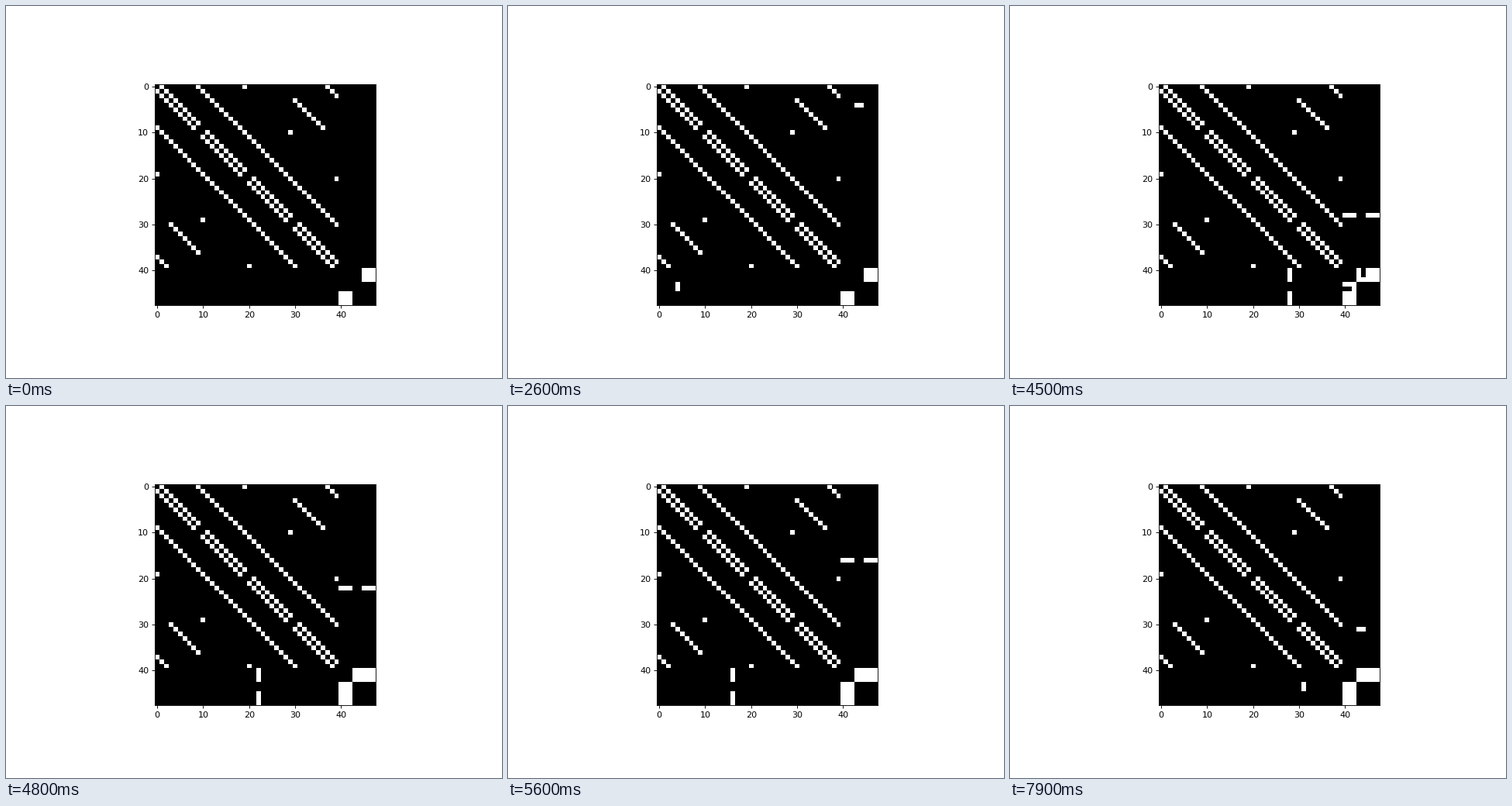
A matplotlib script that plays this animation: 640 px wide and 480 px high, repeating every 8000 ms.

```python
import numpy as np
import matplotlib.pyplot as plt
from matplotlib.animation import FuncAnimation

PLANES, PER_PLANE = 4, 10
SATS = PLANES * PER_PLANE
TEAM_A = [40, 41, 42]
ROVERS = [43, 44]
TEAM_B = [45, 46, 47]
NODES = 48
FRAMES, STEP_MS = 80, 100

# Each pass: first step, number of steps, plane, slot at its start, stations.
# The satellite overhead moves back two slots per step.
PASSES = [
    (5, 6, 1, 8, ROVERS),
    (25, 3, 0, 6, ROVERS),
    (41, 8, 2, 6, TEAM_A + TEAM_B),
    (49, 9, 1, 0, TEAM_A + TEAM_B),
    (58, 3, 1, 9, TEAM_A + TEAM_B[:2]),
    (61, 1, 1, 5, TEAM_A),
    (76, 4, 3, 7, ROVERS),
]

# Ground links that appear as the rovers approach: step, rover, station.
APPROACH = [(39, 43, 42), (41, 43, 41), (43, 43, 40),
            (44, 44, 42), (46, 44, 41), (48, 44, 40)]


def link(m, a, b):
    m[a, b] = m[b, a] = 1


def constellation():
    m = np.zeros((NODES, NODES))
    for p in range(PLANES):
        for k in range(PER_PLANE):
            sat = p * PER_PLANE + k
            link(m, sat, p * PER_PLANE + (k + 1) % PER_PLANE)
            shift = 1 if p < PLANES - 1 else -3
            q = (p + 1) % PLANES
            link(m, sat, q * PER_PLANE + (k - shift) % PER_PLANE)
    for a in TEAM_A:
        for b in TEAM_B:
            link(m, a, b)
    return m


BASE = constellation()


def adjacency(i):
    m = BASE.copy()
    for start, rover, station in APPROACH:
        if i >= start:
            link(m, rover, station)
    for start, count, plane, slot, stations in PASSES:
        if start <= i < start + count:
            sat = plane * PER_PLANE + (slot - 2 * (i - start)) % PER_PLANE
            for s in stations:
                link(m, sat, s)
    return m


fig = plt.figure(figsize=(8, 6), dpi=80, facecolor="white")
ax = fig.add_axes([192 / 640, 94 / 480, 285 / 640, 285 / 480])
image = ax.imshow(BASE, cmap="gray", vmin=0, vmax=1, interpolation="nearest")
ax.set_xticks(range(0, 41, 10))
ax.set_yticks(range(0, 41, 10))


def update(i):
    image.set_data(adjacency(i))
    return [image]


anim = FuncAnimation(fig, update, frames=FRAMES, interval=STEP_MS,
                     repeat=True, repeat_delay=0)
plt.show()
```
